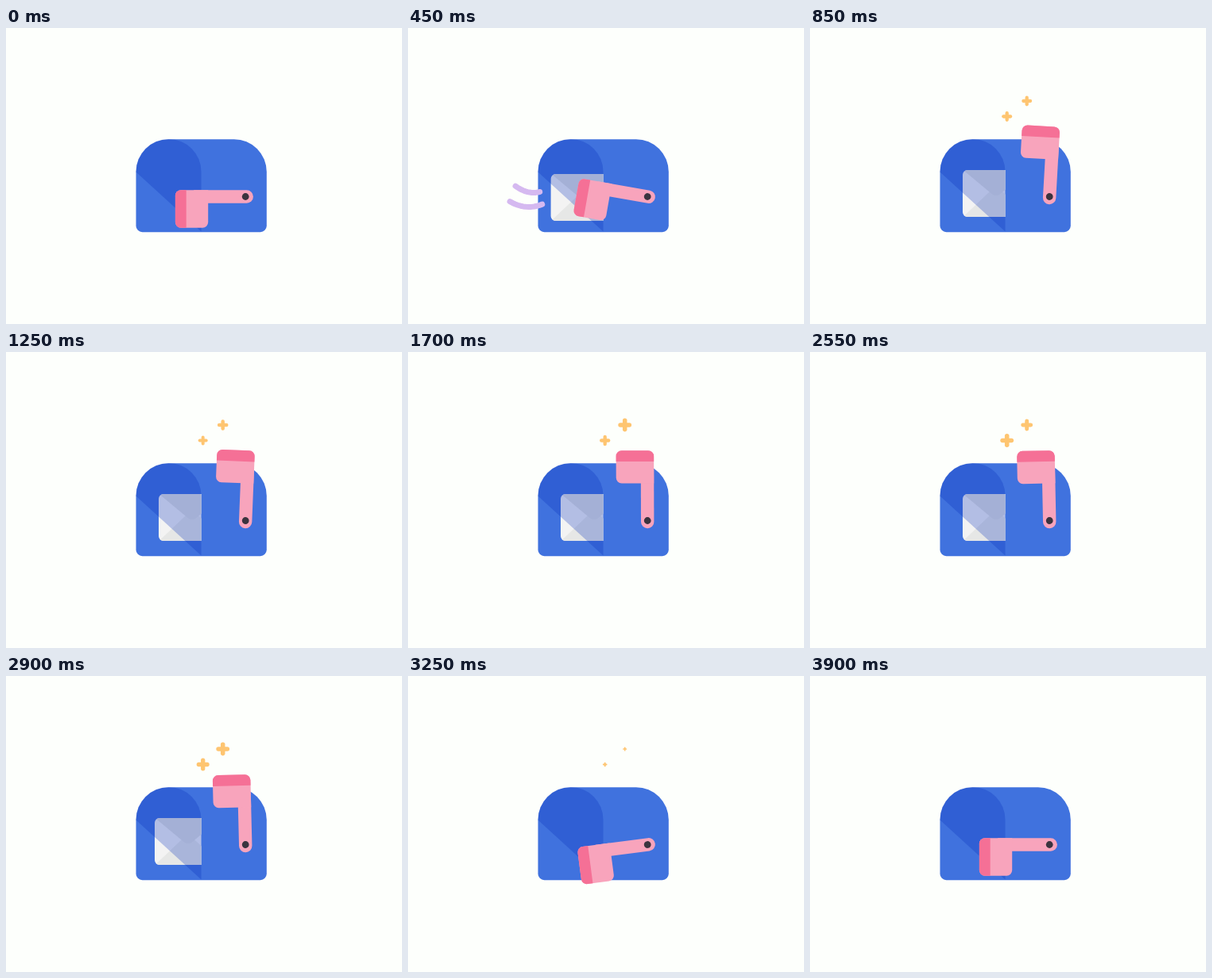
An HTML page with a canvas for the animation above (3950 ms loop, 498 px wide and 373 px high).

```html
<!DOCTYPE html>
<html>
<head>
<meta charset="utf-8">
<title>Mailbox</title>
<style>
  html, body { margin: 0; width: 100%; height: 100%; overflow: hidden; background: #fdfffc; }
  canvas { display: block; }
</style>
</head>
<body>
<canvas id="stage" width="498" height="373"></canvas>
<script>
const ctx = document.getElementById('stage').getContext('2d');
const LOOP = 3950, STEP = 50, TAU = Math.PI * 2, FACE_EDGE = 245.5;
const RAISED = 538, LOWERING = 2900, LOWERED = 3200;

const rad = degrees => degrees * Math.PI / 180;
const mix = (a, b, u) => a + (b - a) * u;
const progress = (t, from, to) => Math.min(1, Math.max(0, (t - from) / (to - from)));
const easeOut = (u, power) => 1 - (1 - u) ** power;
const easeInBack = (u, pull) => u * u * ((pull + 1) * u - pull);
const wave = (t, peak, period) => Math.cos(TAU * (t - peak) / period);

function roundBox(x, y, w, h, radii, color) {
  ctx.beginPath();
  ctx.roundRect(x, y, w, h, radii);
  ctx.fillStyle = color;
  ctx.fill();
}

function drawLetter(t) {
  const enter = easeOut(progress(t, 50, 590), 2), rest = 1 - enter;
  const leave = easeInBack(progress(t, 2800, 3150), 1.7);
  const scale = easeOut(progress(t, 0, 200), 2);
  if (!scale || leave === 1) return;
  ctx.save();
  ctx.beginPath();
  ctx.rect(0, 0, FACE_EDGE, 373);
  ctx.clip();
  // The letter swoops down past the slot and rises into it
  ctx.translate(mix(50, 234, enter) + 66 * leave, mix(126, 208.5, enter) + 168 * enter * rest);
  ctx.rotate(rad(24 * rest * rest));
  ctx.scale(scale, scale);
  roundBox(-42, -29.5, 84, 59, 6, '#f3f3f3');
  ctx.clip();
  ctx.beginPath();
  ctx.moveTo(-42, 30);
  ctx.lineTo(0, -10);
  ctx.lineTo(42, 30);
  ctx.fillStyle = '#e6e7e6';
  ctx.fill();
  ctx.beginPath();
  ctx.moveTo(-42, -30);
  ctx.lineTo(-6, 0);
  ctx.quadraticCurveTo(0, 5, 6, 0);
  ctx.lineTo(42, -30);
  ctx.fillStyle = '#dfe0e0';
  ctx.fill();
  ctx.restore();
}

function drawShade() {
  ctx.beginPath();
  ctx.moveTo(163.5, 181.5);
  ctx.arc(204.5, 181, 41, Math.PI, TAU);
  ctx.lineTo(FACE_EDGE, 256.5);
  ctx.closePath();
  ctx.fillStyle = 'rgba(4,44,184,.27)';
  ctx.fill();
}

function drawTrail(from, to, lowX, lowY, bend) {
  ctx.beginPath();
  for (let i = 0; i <= 12; i++) {
    const x = mix(from, to, i / 12);
    ctx.lineTo(x, lowY - bend * (x - lowX) ** 2);
  }
  ctx.strokeStyle = '#d5b9f0';
  ctx.lineWidth = 7;
  ctx.lineCap = ctx.lineJoin = 'round';
  ctx.stroke();
}

function drawTrails(t) {
  const u = progress(t, 200, 600);
  if (u === 0 || u === 1) return;
  const tail = mix(98, 168, u ** 1.35), head = mix(98, 168, easeOut(u, 3.5));
  drawTrail(tail, head, 158, 207.5, .016);
  drawTrail(tail - 7, head + 3, 152, 225.5, .012);
}

function flagAngle(t) {
  if (t < RAISED) return mix(-90, 15, progress(t, 350, RAISED + 12) ** 3.4);
  if (t < LOWERING) return (2 + 13 * Math.exp((RAISED - t) / 190)) * wave(t, RAISED, 356);
  if (t < LOWERED) return mix(-1.4, -90, easeInBack(progress(t, LOWERING, LOWERED), 2.6));
  const since = t - LOWERED;
  return -90 - 14 * Math.exp(-since / 80) * Math.sin(TAU * since / 200);
}

function drawFlag(t) {
  ctx.save();
  ctx.translate(301.2, 212.5);
  ctx.rotate(rad(flagAngle(t)));
  roundBox(-8.2, -65, 16.4, 74.7, [0, 0, 8.2, 8.2], '#f8a4bc');
  roundBox(-39.3, -88.3, 47.5, 41.3, [7, 7, 0, 7], '#f8a4bc');
  roundBox(-39.3, -88.3, 47.5, 13.8, [7, 7, 0, 0], '#f57096');
  ctx.beginPath();
  ctx.arc(0, 0, 4.4, 0, TAU);
  ctx.fillStyle = '#3b343f';
  ctx.fill();
  ctx.restore();
}

function drawSparkle(x, y, size) {
  if (size <= 0) return;
  const thick = size * .66;
  roundBox(x - size, y - thick / 2, size * 2, thick, thick / 2, '#fec571');
  roundBox(x - thick / 2, y - size, thick, size * 2, thick / 2, '#fec571');
}

function drawSparkles(t) {
  const grow = progress(t, 500, 700) - progress(t, 3100, 3350);
  drawSparkle(272.7, 92, grow * (7.25 + 1.25 * wave(t, 1620, 1200)));
  drawSparkle(247.7, 111.5, grow * (7.2 + 1.2 * wave(t, 2550, 2600)));
}

function draw(now) {
  const t = Math.floor(now % LOOP / STEP) * STEP;
  ctx.fillStyle = '#fdfffc';
  ctx.fillRect(0, 0, 498, 373);
  roundBox(163.5, 140.2, 164.3, 117, [41, 41, 8, 8], '#4072de');
  drawLetter(t);
  drawShade();
  drawTrails(t);
  drawSparkles(t);
  drawFlag(t);
}

const start = performance.now();
function tick() {
  draw(performance.now() - start);
  requestAnimationFrame(tick);
}
tick();
</script>
</body>
</html>
```
